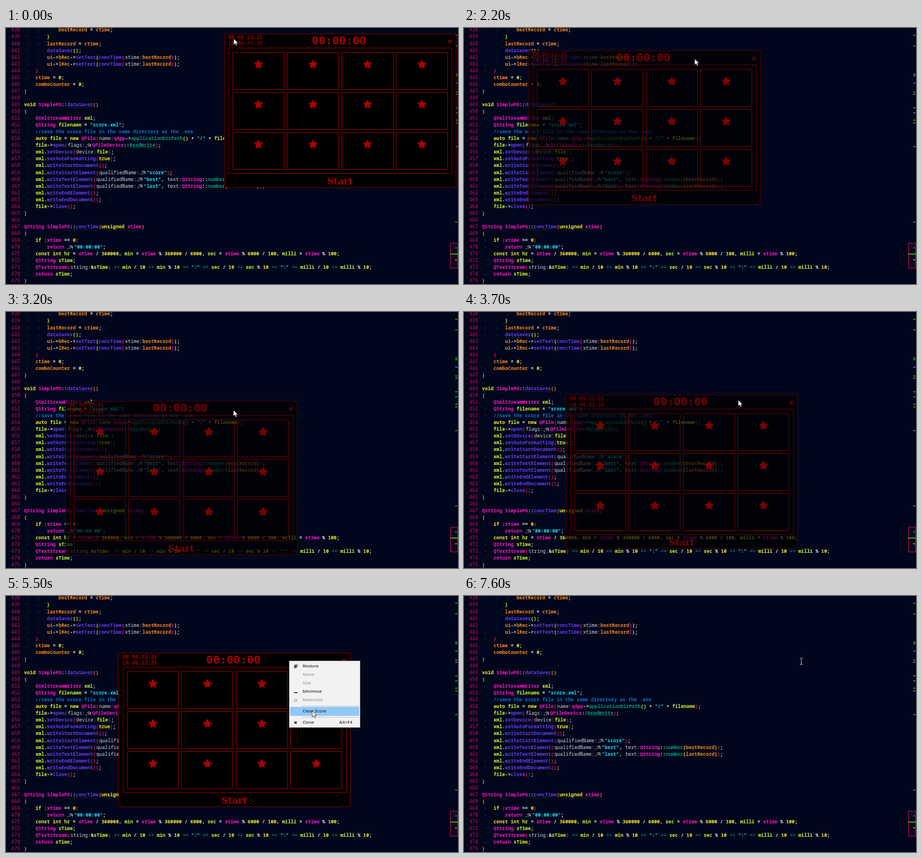
Recreate the animation shown at these times as an HTML page with a canvas. Size 800 by 455 pixels, loop 7.9 s.

```html
<!DOCTYPE html>
<html lang="en">
<head>
<meta charset="utf-8">
<title>Code editor with a fading game window</title>
<style>
html, body { margin: 0; width: 100%; height: 100%; overflow: hidden; background: #00071c; }
canvas { display: block; }
</style>
</head>
<body>
<canvas id="stage" width="800" height="455"></canvas>
<script>
const ctx = document.getElementById('stage').getContext('2d');
const LOOP = 7900, STEP = 100;
const CHAR = 5.075, ROW = 12.054, LEFT = 32;
const CODE = '"Noto Sans Mono", monospace';
const MONO = '"DejaVu Sans Mono", monospace';
const UI = '"Open Sans", sans-serif';

const colors = {
  o: '#f5861c', y: '#f6ea30', g: '#cdf52a', m: '#fb14c8', p: '#6a3af5', c: '#16dcf5',
  b: '#0b6fd0', t: '#0a9377', w: '#e6eaec', r: '#e8104c', h: '#d4d7da'
};

// "~x" switches colour; ~h is an inlay hint, ~i a small hint icon.
const code = `            ~obestRecord ~w= ~octime~w;
        ~g}
        ~olastRecord ~w= ~octime~w;
        ~pdataSaver~g()~w;
        ~oui~w->~obRec~w->~psetText~g(~pconcTime~m(~hxtime:~obestRecord~m)~g)~w;
        ~oui~w->~olRec~w->~psetText~g(~pconcTime~m(~hxtime:~olastRecord~m)~g)~w;
    ~r}
    ~octime ~w= ~y0~w;
    ~ocomboCounter ~w= ~y0~w;
~o}

~yvoid ~mSimplePG~w::~pdataSaver~o()
~o{
    ~mQXmlStreamWriter ~gxml~w;
    ~mQString ~gfilename ~w= ~c"score.xml"~w;
    ~b//save the score file in the same directory as the .exe
    ~yauto ~gfile ~w= ~ynew ~mQFile~r(~hname:~mqApp~w->~tapplicationDirPath~g() ~w+ ~c"/" ~w+ ~gfilename~r)~w;
    ~gfile~w->~popen~r(~hflags:~i~mQFileDevice~w::~tReadWrite~r)~w;
    ~gxml~w.~psetDevice~r(~hdevice:~gfile~r)~w;
    ~gxml~w.~psetAutoFormatting~r(~ytrue~r)~w;
    ~gxml~w.~pwriteStartDocument~r()~w;
    ~gxml~w.~pwriteStartElement~r(~hqualifiedName:~i~c"score"~r)~w;
    ~gxml~w.~pwriteTextElement~r(~hqualifiedName:~i~c"best"~w, ~htext:~mQString~w::~tnumber~g(~obestRecord~g)~r)~w;
    ~gxml~w.~pwriteTextElement~r(~hqualifiedName:~i~c"last"~w, ~htext:~mQString~w::~tnumber~g(~olastRecord~g)~r)~w;
    ~gxml~w.~pwriteEndElement~r()~w;
    ~gxml~w.~pwriteEndDocument~r()~w;
    ~gfile~w->~pclose~r()~w;
~o}

~mQString ~mSimplePG~w::~pconcTime~o(~yunsigned ~mxtime~o)
~o{
    ~yif ~r(~mxtime ~w== ~y0~r)
        ~mreturn ~i~c"00:00:00"~w;
    ~yconst int ~ghr ~w= ~mxtime ~w/ ~y360000~w, ~gmin ~w= ~mxtime ~w% ~y360000 ~w/ ~y6000~w, ~gsec ~w= ~mxtime ~w% ~y6000 ~w/ ~y100~w, ~gmilli ~w= ~mxtime ~w% ~y100~w;
    ~mQString ~gsTime~w;
    ~mQTextStream~r(~hstring:~w&~gsTime~r) ~t<< ~gmin ~w/ ~y10 ~t<< ~gmin ~w% ~y10 ~t<< ~c":" ~t<< ~gsec ~w/ ~y10 ~t<< ~gsec ~w% ~y10 ~t<< ~c":" ~t<< ~gmilli ~w/ ~y10 ~t<< ~gmilli ~w% ~y10~w;
    ~mreturn ~gsTime~w;
~o}`.split('\n');

const windowPath = [
  [0, 386, 10], [100, 378, 16], [300, 200, 85], [500, 81, 132], [700, 190, 100], [900, 330, 68],
  [1200, 395, 22], [1300, 390, 9], [1500, 286, 14], [1600, 293, 13], [1700, 294, 12], [2000, 180, 30],
  [2400, 47, 49], [2500, 38, 40], [2600, 33, 66], [2700, 45, 92], [2900, 100, 140], [3000, 137, 158],
  [3200, 105, 158], [3400, 61, 176], [3600, 145, 166], [3700, 180, 147], [3900, 198, 110],
  [4100, 190, 111], [4200, 183, 105], [4400, 199, 101]
];
const cursorPath = [
  [4400, 502, 115], [4900, 502, 115], [5300, 542, 204], [6300, 542, 204], [7000, 597, 113]
];
const DRAG_START = 100, DRAG_END = 4400, MENU_OPEN = 4800, MENU_PICK = 5800, CLOSE = 7400;

function along(path, t) {
  const next = path.findIndex(p => p[0] > t);
  if (next < 0) return path[path.length - 1].slice(1);
  if (!next) return path[0].slice(1);
  const [t0, x0, y0] = path[next - 1], [t1, x1, y1] = path[next];
  const k = (t - t0) / (t1 - t0);
  return [x0 + (x1 - x0) * k, y0 + (y1 - y0) * k];
}

function rect(x, y, w, h, color) {
  ctx.fillStyle = color;
  ctx.fillRect(x, y, w, h);
}

function box(x, y, w, h, color) {
  ctx.strokeStyle = color;
  ctx.lineWidth = 1;
  ctx.strokeRect(Math.round(x) + .5, Math.round(y) + .5, w, h);
}

function text(str, x, y, color, font, align = 'left') {
  ctx.font = font;
  ctx.fillStyle = color;
  ctx.textAlign = align;
  ctx.fillText(str, x, y);
}

function polygon(points, fill, stroke, width = 1) {
  ctx.beginPath();
  points.forEach(p => ctx.lineTo(...p));
  ctx.closePath();
  ctx.fillStyle = fill;
  ctx.fill();
  ctx.strokeStyle = stroke;
  ctx.lineWidth = width;
  ctx.stroke();
}

function cross(x, y, r, color, width) {
  ctx.beginPath();
  ctx.moveTo(x - r, y - r); ctx.lineTo(x + r, y + r);
  ctx.moveTo(x + r, y - r); ctx.lineTo(x - r, y + r);
  ctx.strokeStyle = color;
  ctx.lineWidth = width;
  ctx.stroke();
}

function hintIcon(x, y) {
  ctx.strokeStyle = colors.h;
  ctx.lineWidth = 1;
  ctx.beginPath();
  ctx.moveTo(x + 1, y + 2.5); ctx.lineTo(x + 3, y + 2.5);
  ctx.moveTo(x + 3, y - .5); ctx.lineTo(x + 5, y - 2.5); ctx.lineTo(x + 9, y - 2.5); ctx.lineTo(x + 10, y);
  ctx.moveTo(x + 5, y + 2.5); ctx.lineTo(x + 6.5, y); ctx.lineTo(x + 9, y); ctx.lineTo(x + 10, y + 2.5);
  ctx.stroke();
}

function drawLine(line, row) {
  const y = 4 + row * ROW;
  const font = '600 8.46px ' + CODE;
  text(438 + row, 9.5, y, '#dc064e', '500 8.46px ' + CODE);
  const [indent, ...parts] = line.split(/~(.)/);
  for (let i = 0; i < indent.length; i += 4)
    text('→', LEFT + 3.5 + i * CHAR, y, '#24425c', '6px ' + MONO);
  let x = LEFT + indent.length * CHAR;
  for (let i = 0; i < parts.length; i += 2) {
    const [kind, str] = [parts[i], parts[i + 1]];
    if (kind === 'i') {
      hintIcon(x, y);
      x += 12.5;
    } else if (kind === 'h') {
      text(str, x + 1, y, colors.h, '500 8.46px ' + CODE);
      x += str.length * CHAR + 1.5;
    } else {
      text(str, x, y, colors[kind], font);
      x += str.length * CHAR;
    }
  }
}

function drawEditor() {
  rect(0, 0, 800, 455, '#00071c');
  code.forEach(drawLine);
  for (const [x, y, w] of [[108, 141, 46], [108, 358, 41], [169, 358, 75]]) rect(x, y, w, 1, '#1a2622');
  rect(220, 212, 45, 1, '#08502f');
  for (const y of [12, 31, 81, 84, 113, 117, 141, 150, 163, 168, 210, 344]) rect(795, y, 4, 1.5, '#3fae2a');
  rect(795, 97, 4, 2, '#1c6fe0');
  rect(787, 383, 12, 43, 'rgba(192,10,74,.07)');
  box(786, 382, 13, 44, '#c00a4a');
  rect(786, 401, 14, 1.5, '#43d42c');
  rect(795, 390, 3, 1.5, '#3fae2a');
  rect(795, 411, 3, 2, '#e08a1c');
}

function star(cx, cy) {
  const points = Array.from({ length: 10 }, (_, i) => {
    const r = i % 2 ? 4 : 7.6, a = i * Math.PI / 5 - Math.PI / 2;
    return [cx + r * Math.cos(a), cy + .5 + r * Math.sin(a)];
  });
  ctx.lineJoin = 'round';
  polygon(points, '#aa0000', '#aa0000', 1.2);
}

function drawGame(t) {
  const [x, y] = along(windowPath, t).map(Math.round);
  const score = t < MENU_PICK ? '00:22:25' : '00:00:00';
  ctx.save();
  ctx.globalAlpha = t >= DRAG_START && t < DRAG_END ? .7 : 1;
  ctx.translate(x, y);
  rect(0, 0, 411, 274, '#000');
  box(0, 0, 410, 273, '#700000');
  text('BR ' + score, 7.5, 7.5, '#a00000', 'bold 9.2px ' + MONO);
  text('LR ' + score, 7.5, 19, '#a00000', 'bold 9.2px ' + MONO);
  text('00:00:00', 203.5, 13.5, '#a80000', 'bold 20px ' + MONO, 'center');
  cross(399.5, 14, 3, '#b00000', 1.6);
  box(8, 25, 395, 223, '#800000');
  for (let i = 0; i < 12; i++) {
    const cx = i % 4 * 96.4, cy = Math.floor(i / 4) * 71;
    box(15 + cx, 33 + cy, 91, 66, '#980000');
    star(61 + cx, 54.5 + cy);
  }
  text('Start', 205, 263.5, '#a80000', 'bold 16px "DejaVu Serif", serif', 'center');
  ctx.restore();
}

function drawTooltip() {
  rect(402, 30, 51, 13, '#000');
  text('best record', 407, 36, '#800000', '8px ' + UI);
}

function drawMenu([cx, cy]) {
  rect(503, 117, 126, 119, 'rgba(0,0,0,.5)');
  rect(501, 115, 126, 119, '#f2f2f2');
  box(501, 115, 125, 118, '#b4b4b4');
  const rows = [['Restore', 125, 1], ['Move', 140], ['Size', 155], ['Minimise', 170, 1],
    ['Maximise', 185], ['Clear Score', 205, 1], ['Close', 225, 1]];
  for (const [label, y, enabled] of rows) {
    if (enabled && cx > 503 && Math.abs(cy - y) < 7.5) rect(503, y - 8, 122, 16, '#90c8f6');
    text(label, 525, y, enabled ? '#000' : '#858585', '8px ' + UI);
  }
  text('Alt+F4', 613, 225, '#000', '8px ' + UI, 'right');
  rect(523, 195, 102, 1, '#c8c8c8');
  rect(523, 215, 102, 1, '#c8c8c8');
  box(511, 122, 4, 3, '#222');
  box(510, 124, 3, 3, '#222');
  rect(510, 171, 6, 1.5, '#111');
  box(510, 183, 4, 4, '#999');
  cross(512.5, 225, 2, '#111', 1.5);
}

function drawArrow([x, y]) {
  const shape = [[0, 0], [0, 11], [2.6, 8.7], [4.5, 12.6], [6.3, 11.8], [4.5, 8], [8, 8]];
  ctx.lineJoin = 'miter';
  polygon(shape.map(([a, b]) => [x + a, y + b]), '#fff', '#111', .7);
}

function drawIBeam(x, y) {
  rect(x - .5, y - 5, 1, 11, '#c8c8c8');
  for (const dy of [-6, 5]) {
    rect(x - 2.5, y + dy, 2, 1, '#c8c8c8');
    rect(x + .5, y + dy, 2, 1, '#c8c8c8');
  }
}

function cursorAt(t) {
  if (t < DRAG_START) return [403, 19];
  if (t >= DRAG_END) return along(cursorPath, t);
  // The pointer runs slightly ahead of the dragged window.
  const [x, y] = along(windowPath, t + 25);
  return [x + 303, y + 14];
}

function draw(t) {
  ctx.textBaseline = 'middle';
  drawEditor();
  if (t >= CLOSE) return drawIBeam(597, 116);
  const cursor = cursorAt(t);
  drawGame(t);
  if (t < DRAG_START) drawTooltip();
  if (t >= MENU_OPEN && t < MENU_PICK) drawMenu(cursor);
  drawArrow(cursor);
}

const start = performance.now();
let shown = -1;
function tick() {
  const t = Math.floor((performance.now() - start) % LOOP / STEP) * STEP;
  if (t !== shown) draw(shown = t);
  requestAnimationFrame(tick);
}
tick();
</script>
</body>
</html>
```
